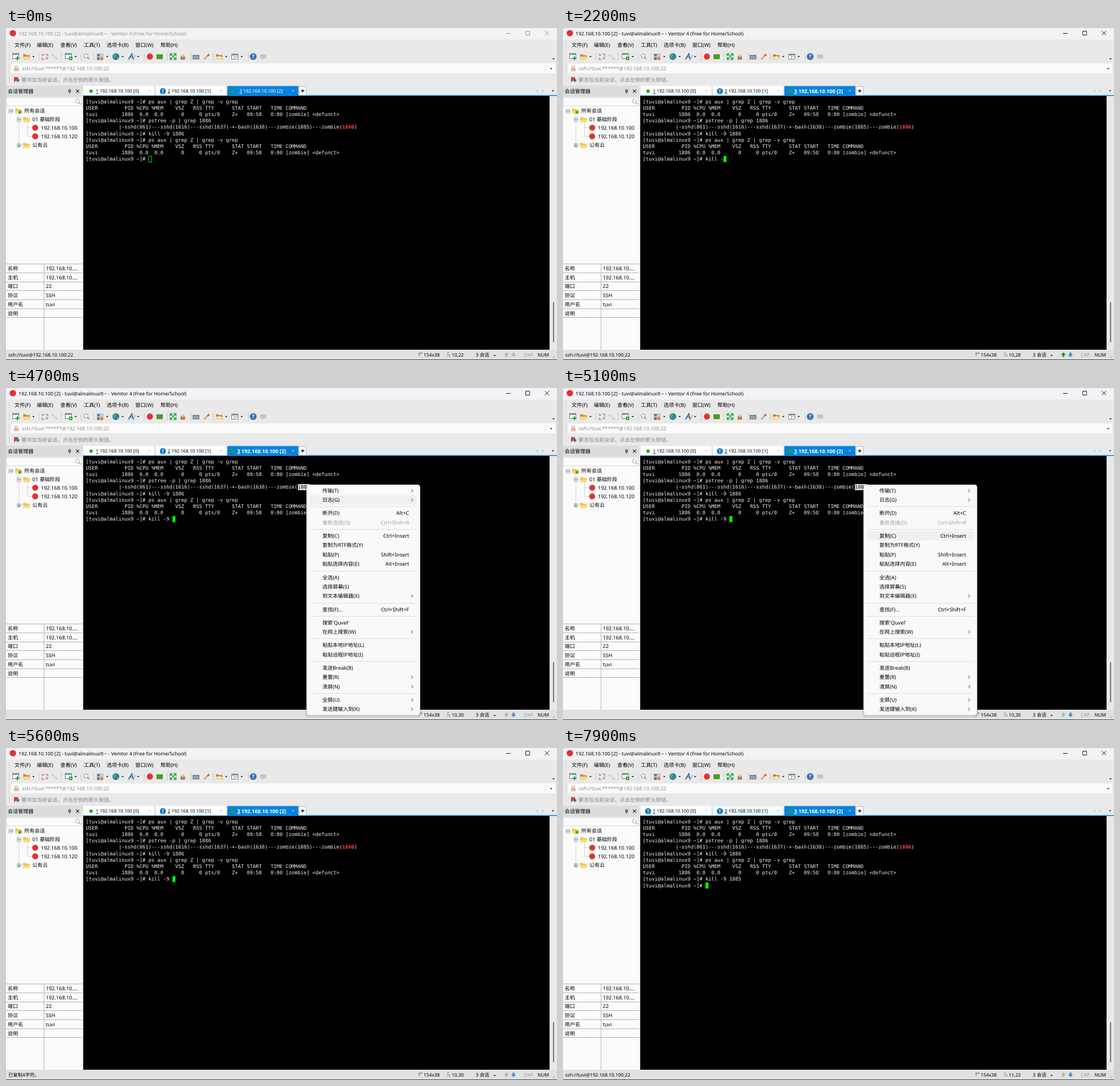
Write an HTML page that moves like this. It is 963x581 px and loops after 8 s.

```html
<!DOCTYPE html>
<html lang="zh">
<head>
<meta charset="utf-8">
<title>Terminal</title>
<style>
html, body { margin: 0; width: 100%; height: 100%; overflow: hidden; background: #e9e9e9; }
svg { display: block; width: 963px; height: 581px; }
text { font: 9px "Noto Sans", "Noto Sans CJK SC", "Noto Sans CJK", sans-serif; white-space: pre; text-rendering: geometricPrecision; }
.mono { font: 8.67px "DejaVu Sans Mono", monospace; }
.u { text-decoration: underline; }
</style>
</head>
<body>
<svg id="stage" viewBox="0 0 963 581"></svg>
<script>
const LOOP = 8000, BLUE = '#0883de', RED = '#e2322d', GREEN = '#12a51c';
const USER = 'tuvi', HOST = '192.168.10.100';

const rect = (x, y, w, h, fill, more = '') =>
  `<rect x="${x}" y="${y}" width="${w}" height="${h}" fill="${fill}" ${more}/>`;
const box = (x, y, w, h, stroke, fill = 'none') => rect(x, y, w, h, fill, `stroke="${stroke}"`);
const dot = (x, y, r, fill) => `<circle cx="${x}" cy="${y}" r="${r}" fill="${fill}"/>`;
const line = (d, stroke, width = 1, more = '') =>
  `<path d="${d}" fill="none" stroke="${stroke}" stroke-width="${width}" ${more}/>`;
const shape = (d, fill) => `<path d="${d}" fill="${fill}"/>`;
// y is the middle of the line of text
const text = (x, y, s, fill = '#000', size = 9, more = '') =>
  `<text x="${x}" y="${y + size * 0.36}" fill="${fill}" style="font-size:${size}px;${more}">${s}</text>`;
const endText = (x, y, s, fill) => text(x, y, s, fill, 9, 'text-anchor:end');
const drop = (x, y, fill = '#222') => shape(`M${x - 2} ${y - 1}h4l-2 2.5z`, fill);
const cross = (x, y, r, c, w = 1) =>
  line(`M${x - r} ${y - r}l${2 * r} ${2 * r}M${x + r} ${y - r}l${-2 * r} ${2 * r}`, c, w);
const folder = (x, y, c = '#f0c150') =>
  shape(`M${x - 6} ${y - 4}h4l1.5 1.5h6v7h-11.5z`, c) + shape(`M${x - 6} ${y}h12v4.5h-12z`, '#fad977');
const lens = (x, y, c) => `<circle cx="${x}" cy="${y}" r="3.6" fill="#f6fafc" stroke="${c}"/>` +
  line(`M${x + 2.6} ${y + 2.6}l3 3`, c, 1.5);
const lock = (x, y, c) => line(`M${x - 2.2} ${y}v-2a2.2 2.2 0 0 1 4.4 0v2`, '#aaa', 1.2) + rect(x - 4, y - 1, 8, 5.5, c);
const pane = (x, y) => box(x - 5.5, y - 4.5, 11, 9, '#6d8794', '#fff') + rect(x - 5.5, y - 4.5, 11, 2.5, '#7795a5');
const info = (x, y) => dot(x, y, 5.3, '#0877c9') + rect(x - .7, y - 3.2, 1.4, 4, '#fff') + rect(x - .7, y + 1.7, 1.4, 1.4, '#fff');
const arrow = (x, y, dir, c) =>
  shape(`M${x} ${y - 4 * dir}l4.4 ${4.4 * dir}h-2.7v${3.6 * dir}h-3.4v${-3.6 * dir}h-2.7z`, c);

function toolbar() {
  let s = '';
  for (const x of [57, 96, 131, 153, 241, 281, 323, 362, 423]) s += line(`M${x}.5 44v13`, '#c8c8c8');
  for (const x of [48, 122, 177, 204, 231, 385, 412]) s += drop(x, 50);
  s += pane(17, 49) + line('M20 49.5v7M16.5 53h7', GREEN, 2);
  s += folder(36, 50, '#c98d36');
  s += line('M63 46l3 2M70 52l3 2', '#d8706c', 2.5) + line('M69 46h4v4M63 51v4h4', '#999', 1.5);
  s += line('M80 46l4 4M86 51l4 4', '#ccc', 3);
  s += pane(109, 49) + dot(113, 53, 3.3, GREEN) + dot(113, 53, 1.2, '#fff');
  s += lens(140, 49, '#8b8b8b');
  s += rect(159, 45, 5, 5, '#4d8bc4') + rect(159, 51, 5, 5, '#777') + rect(165, 51, 5, 5, '#e07a35') + box(165.5, 45.5, 4, 4, '#999');
  s += dot(192, 50, 6, '#2878b8') + shape('M188 46q4-3 6 0l-2 4-3 3-2-3zM194 50l3 1-2 4-2-1z', '#52aa57');
  s += line('M214 55l6-10 2 10M217 51h4', '#35679a', 1.7) + line('M222 56l4-9', '#7b91a5');
  s += dot(251.5, 50, 5.4, RED) + rect(263, 46, 11, 8.5, '#4b9b20');
  s += line('M287 49v-4h4M293 45h4v4M297 51v4h-4M291 55h-4v-4M287 45l10 10M297 45l-10 10', '#20a33a', 1.6);
  s += lock(309, 51, '#b58058');
  s += rect(326, 47, 12, 8, '#7b858b') + line('M328 50h8M328 52.5h8', '#fff', 1, 'stroke-dasharray="1.2 1"');
  s += line('M346 55l6-6', '#d8a574', 2.6) + line('M352 49l3-3', '#c64b35', 2.6);
  s += folder(373, 50, '#b9894d') + line('M373 49v5M370.5 51.5h5', '#fff', 1.3);
  s += pane(400, 50) + line('M399 47v7M399 50.5h6', '#7795a5');
  s += dot(432, 50, 6, '#3972ad') + text(429.8, 50, '?', '#fff', 9, 'font-weight:bold');
  s += rect(444, 46, 11, 7, '#c4c4c4', 'rx="2.5"') + shape('M447 52h4l-3 4z', '#c4c4c4');
  return s + drop(957, 54);
}

function sidebar() {
  let s = rect(0, 101, 133, 19, '#dbdcde') + text(3, 110.5, '会话管理器');
  s += line('M109 108h4M110 108v3M112.5 108v3M108.5 111.5h5M111 112v3', '#222') + cross(125, 110.5, 2.7, '#222', 1.2);
  s += box(.5, 121.5, 132, 15, '#d5d8dc', '#fbfbfb') + lens(125, 128, '#aab2b8');
  s += rect(0, 137, 133, 275, '#fbfbfb');
  s += line('M8.5 145H18M22.5 150v54M22.5 160H30M37.5 165v24.5H46M37.5 174.5H46M22.5 204.5H30', '#aaa', 1, 'stroke-dasharray="1 1"');
  for (const [x, y, plus] of [[8.5, 145.5], [22.5, 160.5], [22.5, 205.5, 1]])
    s += box(x - 3, y - 3, 6, 6, '#9aa5ad', '#fff') + line(`M${x - 2} ${y}h4${plus ? 'm-2-2v4' : ''}`, '#345');
  s += folder(22, 145) + rect(22, 145, 5, 5, '#6ba13e') + folder(36, 160) + folder(36, 205);
  s += dot(51, 174.5, 5.2, RED) + dot(51, 189.5, 5.2, RED);
  s += text(32, 145, '所有会话') + text(46, 159.5, '01 基础阶段') + text(61, 174.5, HOST) +
    text(61, 189.5, '192.168.10.120') + text(46, 204.5, '公有云');
  s += rect(0, 413, 133, 150, '#fbfbfb') + line('M0 413H133M66.5 413V563', '#b4b4b4');
  const props = [['名称', '192.168.10....'], ['主机', '192.168.10....'], ['端口', '22'], ['协议', 'SSH'], ['用户名', USER], ['说明', '']];
  props.forEach(([key, value], i) => {
    const y = 420.8 + i * 15.7;
    s += text(3, y, key) + text(69.5, y, value) + line(`M0 ${Math.round(y + 8) - .5}H133`, '#b4b4b4');
  });
  return s;
}

function frame() {
  let s = rect(0, 0, 963, 581, '#e9e9e9') + rect(0, 0, 963, 20, '#f3f3f7') + dot(12, 9, 5.6, RED);
  ['文件(F)', '编辑(E)', '查看(V)', '工具(T)', '选项卡(B)', '窗口(W)', '帮助(H)']
    .forEach((m, i) => s += text([15, 54, 95, 136, 176, 226, 270][i], 30, m));
  for (const y of [25, 45, 65, 85]) s += line(`M5.5 ${y}v12`, '#aaa', 1, 'stroke-dasharray="1 2"');
  s += toolbar();
  s += rect(9, 62, 951, 17, '#fbfbfb') + lock(18, 71, '#e2b78d') +
    text(28, 70.5, `ssh://${USER}:******@${HOST}:22`, '#8a8a8a', 8.8) + drop(953, 71);
  s += shape('M14 86h7v9l-3.5-3-3.5 3z', '#d33b40') + shape('M18 90h3v-2l3 3.5-3 3.5v-2h-3z', '#3c77bd');
  s += text(27, 91, '要添加当前会话，点击左侧的箭头按钮。', '#858585');
  s += sidebar();
  s += rect(135, 101, 828, 17, '#e9eaeb') + rect(135, 117.5, 828, 1.7, BLUE);
  s += rect(135, 119, 815, 444, '#000') + rect(950, 119, 13, 444, '#e9e9e9') + rect(956.3, 480, 1.4, 70, '#444');
  s += box(512.5, 102.5, 12, 15, '#bbb', '#fff') + line('M515.5 110h6M518.5 107v6', '#111', 1.3);
  s += shape('M930 107.5v5l-3-2.5zM937 107.5v5l3-2.5z', '#c4c4c4') + drop(956, 110);
  s += rect(0, 563, 963, 18, '#dfe1e2') + rect(0, 580, 963, 1, '#3a484f');
  s += line('M722 575v-6h5M720.5 570.5l1.5-2 1.5 2M725.5 567.5l2 1.5-2 1.5', '#666', .8);
  s += line('M771 568h3M771 571h3M771 574h3M775.5 571v4', '#777', 1);
  s += text(730, 572, '154x38', '#000', 8.25) + text(821, 572, '3 会话', '#000', 8.4) + shape('M852 574h4l-2-2.6z', '#222');
  s += text(905, 572, 'CAP', '#999', 8.4) + text(929, 572, 'NUM', '#000', 8.4);
  return s + line('M955 578l5-5M958 578l2-2', '#aaa');
}

const X0 = 139.5, Y0 = 123, CW = 5.22, RH = 11.2;
const PROMPT = `[${USER}@almalinux9 ~]# `;
const HEAD = 'USER         PID %CPU %MEM    VSZ   RSS TTY      STAT START   TIME COMMAND';
const PROC = USER + '        1886  0.0  0.0      0     0 pts/0    Z+   09:58   0:00 [zombie] &lt;defunct>';
const PS = [PROMPT + 'ps aux | grep Z | grep -v grep', HEAD, PROC];
const HISTORY = [...PS, PROMPT + 'pstree -p | grep 1886',
  ' '.repeat(11) + '|-sshd(861)---sshd(1616)---sshd(1637)-+-bash(1638)---zombie(1885)---zombie(' +
  '<tspan fill="#ff4545" font-weight="bold">1886</tspan>)',
  PROMPT + 'kill -9 1886', ...PS];
const mono = (col, row, s, fill = '#f2f2f2') =>
  `<text class="mono" x="${X0 + col * CW}" y="${Y0 + row * RH + 8.6}" fill="${fill}">${s}</text>`;
const cell = (col, row, n, fill, more) => rect(X0 + col * CW, Y0 + row * RH + .3, n * CW, 10.6, fill, more);

const MENU = [
  ['传输(T)', '>'], ['日志(G)', '>'], 0, ['断开(D)', 'Alt+C'], ['重新连接(O)', 'Ctrl+Shift+R', 1], 0,
  ['复制(C)', 'Ctrl+Insert'], ['复制为RTF格式(Y)'], ['粘贴(P)', 'Shift+Insert'], ['粘贴选择内容(E)', 'Alt+Insert'], 0,
  ['全选(A)'], ['选择屏幕(S)'], ['到文本编辑器(X)', '>'], 0, ['查找(F)...', 'Ctrl+Shift+F'], 0,
  ["搜索'Quvel'"], ['在网上搜索(W)', '>'], 0, ['粘贴本地IP地址(L)'], ['粘贴远程IP地址(I)'], 0,
  ['发送Break(B)'], ['重置(R)', '>'], ['清屏(N)', '>'], 0, ['全屏(U)', '>'], ['发送键输入到(K)', '>']];

function menu(hover) {
  let s = rect(523, 170, 203, 406, '#000', 'rx="5" opacity=".1"') + rect(525.5, 169.5, 198, 403, '#f9f9f9', 'rx="4" stroke="#cfcfcf"');
  let y = 179.6, index = 0;
  for (const item of MENU) {
    if (!item) {
      s += line(`M531 ${Math.round(y - 5) + .5}H718`, '#dedede');
      y += 6.7;
      continue;
    }
    const [label, key, off] = item, ink = off ? '#a3a3a3' : '#000';
    if (index++ === hover) s += rect(531, y - 8.2, 187, 16.4, '#f0f0f0', 'rx="2"');
    s += text(553, y, label, ink);
    if (key === '>') s += line(`M708.5 ${y - 2.7}l2.7 2.7-2.7 2.7`, '#333');
    else if (key) s += endText(704.5, y, key, ink);
    y += 16.45;
  }
  return s;
}

function tabs(t, active) {
  let s = '';
  for (let i = 0; i < 3; i++) {
    const x = 136 + i * 125.5, on = i === 2, bold = on && active;
    s += rect(x, 101.5, 124, 16.5, on ? BLUE : i === 1 && t >= 7900 ? '#f5fafd' : '#fff');
    if (!on) s += line(`M${x + 124.5} 102v16`, '#b9bec3');
    s += i === 1 || i === 0 && t >= 6800 ? info(x + 12.7, 110.5) : dot(x + (on ? 9 : 12.7), 110.5, 3, '#10b010');
    s += text(x + (bold ? 17 : 21), 110.5, `<tspan class="u">${i + 1}</tspan> ${HOST} [${i}]`, on ? '#fff' : '#000',
      bold ? 9 : 8, bold ? 'font-weight:bold' : '');
    s += cross(x + 114.5, 109.7, 1.8, on ? '#b9dcf7' : '#bbb', .9);
  }
  return s;
}

const KEYS = [1000, 1200, 1400, 1600, 1700, 2200, 2700, 2800];
const SENDING = [[1000, 1500], [1600, 1800], [2200, 2400], [2700, 3000], [6300, 6400], [6800, 7000]];
const HOVER = [[5100, 4], [5000, 3], [4800, 2], [4700, 1]];
const during = (t, a, b) => t >= a && t < b;
const FRAME = frame();

function draw(t) {
  const active = t >= 200, entered = t >= 6800, ink = active ? '#000' : '#8f8f8f';
  let s = FRAME + text(22, 9.5, `${HOST} [2] - ${USER}@almalinux9:~ - Vemtor 4 (Free for Home/School)`, ink, 8.55);
  s += line('M874 9.5h8M908.5 5.5h6.5v7h-6.5z', ink, .9) + cross(945.5, 9, 3.7, ink, .9);
  s += tabs(t, active);

  HISTORY.forEach((row, i) => s += mono(0, i, row));
  const typed = 'kill -9 '.slice(0, KEYS.filter(k => t >= k).length) + (t >= 6300 ? '1885' : '');
  const row = entered ? 10 : 9, col = 21 + (entered ? 0 : typed.length);
  s += mono(0, 9, PROMPT + typed);
  if (entered) s += mono(0, 10, PROMPT);
  s += active ? cell(col, row, 1, '#0f0') : cell(col, row, 1, 'none', 'stroke="#00e000"');

  if (during(t, 4300, 5600)) {
    s += cell(71, 4, 4, '#e8e8e8') + mono(71, 4, '1885', '#000');
    if (t >= 4400) s += rect(544, 186, 18, 18, '#0f609d') +
      line('M547 191.5h12M547 195h12M547 198.5h8', '#4d92c6') + shape('M561 199v4h-4z', '#9accee');
  }

  const status = during(t, 4700, 5300) || during(t, 6400, 7600) ? '' :
    during(t, 5300, 6400) ? '已复制4字符。' : `ssh://${USER}@${HOST}:22`;
  s += text(4, 572, status, '#000', 8.25) + text(779, 572, `${row + 1},${col + 1}`, '#000', 8.25);
  s += arrow(874.5, 571.5, 1, SENDING.some(([a, b]) => during(t, a, b)) ? '#159a20' : '#b5b5b5');
  s += arrow(887, 572, -1, active ? '#4f86cc' : '#b5b5b5');

  if (during(t, 4700, 5300)) s += menu(HOVER.find(h => t >= h[0])[1]);
  if (during(t, 5300, 5600))
    s += `<g opacity="${1 - (t - 5300) / 300}">${rect(527, 250.5, 194.5, 16.5, '#b4b4b4')}` +
      text(553, 258.8, '复制(C)') + endText(704.5, 258.8, 'Ctrl+Insert', '#000') + '</g>';
  return s;
}

const stage = document.getElementById('stage');
let start, shown = -1;
function tick(now) {
  start ??= now;
  const t = Math.floor((now - start) % LOOP / 100) * 100;
  if (t !== shown) stage.innerHTML = draw(shown = t);
  requestAnimationFrame(tick);
}
requestAnimationFrame(tick);
</script>
</body>
</html>
```
